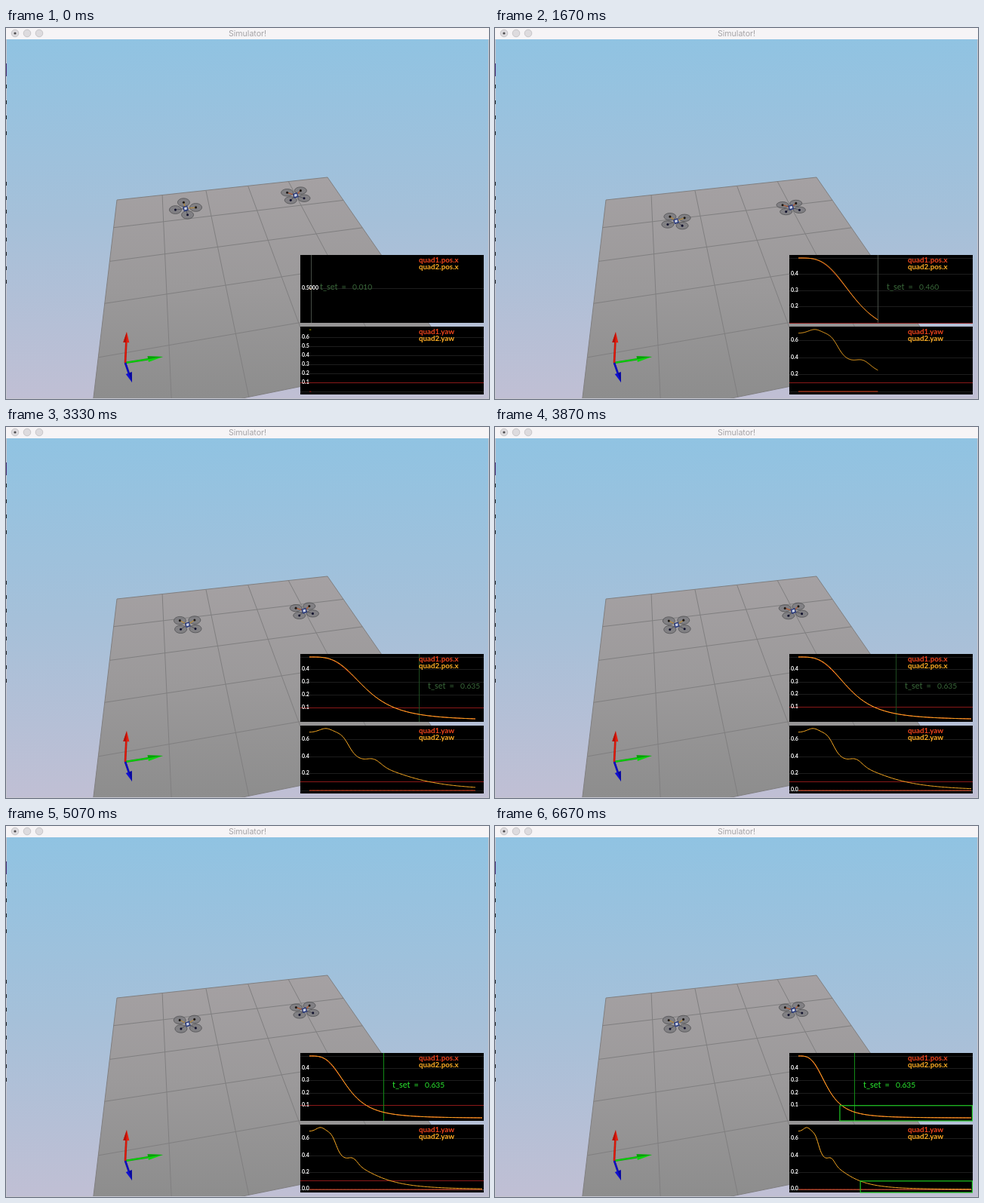
Animation of 640x492 px, one loop 6740 ms. Source, as an HTML page with a canvas:

```html
<!DOCTYPE html>
<html lang="en">
<head>
<meta charset="utf-8">
<title>Simulator!</title>
<style>
  html, body { margin: 0; width: 100%; height: 100%; overflow: hidden; background: #fff; }
  canvas { display: block; width: 640px; height: 492px; }
</style>
</head>
<body>
<canvas id="stage" width="640" height="492"></canvas>
<script>
const ctx = document.getElementById('stage').getContext('2d');
const LOOP = 6740, STEP = 66.67, LAST_STEP = 100;
const SETTLED = 0.635;
const RED = '#f2441c', ORANGE = '#ffae24', GREEN = '#1fc823';

// Smooth fall from 1 to 0, halfway at time `half`
const fall = (t, half, power) => 1 / (1 + (t / half) ** power);
const bump = (t, centre, width) => Math.exp(-(((t - centre) / width) ** 2));

const pos2 = t => .5 * fall(t, .328, 3.4);
const pos1 = t => pos2(t + .005 * bump(t, .18, .1));
const yaw1 = () => 0;
const yaw2 = t => .3 * fall(t, .23, 10) + .39 * fall(t, .53, 3.8)
  + .045 * bump(t, .095, .05) + .06 * bump(t, .375, .055);

const mix = (a, b, p) => a + (b - a) * p;

function line(points, color, width = 1) {
  ctx.beginPath();
  points.forEach(([x, y]) => ctx.lineTo(x, y));
  ctx.strokeStyle = color;
  ctx.lineWidth = width;
  ctx.stroke();
}

function polygon(points, fill) {
  ctx.beginPath();
  points.forEach(([x, y]) => ctx.lineTo(x, y));
  ctx.closePath();
  ctx.fillStyle = fill;
  ctx.fill();
}

function ellipse(x, y, rx, ry, fill, stroke) {
  ctx.beginPath();
  ctx.ellipse(x, y, rx, ry, 0, 0, 2 * Math.PI);
  ctx.fillStyle = fill;
  ctx.fill();
  if (stroke) {
    ctx.strokeStyle = stroke;
    ctx.lineWidth = .9;
    ctx.stroke();
  }
}

function text(str, x, y, color, size, weight = 400, align = 'left', family = 'Lato') {
  ctx.font = `${weight} ${size}px ${family}, sans-serif`;
  ctx.fillStyle = color;
  ctx.textAlign = align;
  ctx.textBaseline = 'middle';
  ctx.fillText(str, x, y);
}

function gradient(y0, y1, ...colors) {
  const g = ctx.createLinearGradient(0, y0, 0, y1);
  colors.forEach((c, i) => g.addColorStop(i / (colors.length - 1), c));
  return g;
}

function drawWindow() {
  ctx.fillStyle = '#c6c7d0';
  ctx.fillRect(0, 0, 640, 492);
  ctx.fillStyle = gradient(15, 491, '#90c3e2', '#a5c0d9', '#c0bfd4');
  ctx.fillRect(1, 15, 638, 476);
  ctx.fillStyle = '#f6f4f6';
  ctx.fillRect(0, 0, 640, 15);
  text('Simulator!', 320, 8.3, '#a5a3a6', 10.6, 400, 'center', 'Inter');
  [12, 28, 44].forEach(x => ellipse(x, 7, 4.8, 4.8, '#dddbde', '#c3c1c4'));
  ellipse(12, 7, 1.6, 1.6, '#4d4b4e');

  // Slivers of the desktop behind the window
  ctx.fillStyle = '#222';
  for (let y = 75; y < 140; y += 20.5) ctx.fillRect(0, Math.round(y), 1, 5);
  for (let y = 204; y < 340; y += 18.6) ctx.fillRect(0, Math.round(y), 1, 5);
  ctx.fillStyle = '#4b2a72';
  ctx.fillRect(0, 47, 1, 17);
}

// Projective map of the unit square onto the floor's four corners
function floorMap([x0, y0], [x1, y1], [x2, y2], [x3, y3]) {
  const ax = x1 - x2, ay = y1 - y2, bx = x3 - x2, by = y3 - y2;
  const sx = x0 - x1 + x2 - x3, sy = y0 - y1 + y2 - y3;
  const det = ax * by - bx * ay;
  const g = (sx * by - bx * sy) / det, h = (ax * sy - sx * ay) / det;
  return (u, v) => {
    const w = 1 + g * u + h * v;
    return [(x0 + (x1 - x0 + g * x1) * u + (x3 - x0 + h * x3) * v) / w,
            (y0 + (y1 - y0 + g * y1) * u + (y3 - y0 + h * y3) * v) / w];
  };
}
const floorPoint = floorMap([147, 228], [426, 198], [590, 435], [111, 532]);

function drawFloor() {
  ctx.save();
  ctx.beginPath();
  ctx.rect(1, 15, 638, 476);
  ctx.clip();
  polygon([floorPoint(0, 0), floorPoint(1, 0), floorPoint(1, 1), floorPoint(0, 1)],
    gradient(198, 491, '#a5a1a3', '#9b999a', '#8d8d8d'));
  for (let i = 0; i <= 5; i++) {
    line([floorPoint(i / 5, 0), floorPoint(i / 5, 1)], '#807f80');
    line([floorPoint(0, i / 5), floorPoint(1, i / 5)], '#807f80');
  }
  ctx.restore();
}

function arrow(x, y, color, dark, head, half) {
  const ox = 158, oy = 444, len = Math.hypot(x - ox, y - oy);
  const ux = (x - ox) / len, uy = (y - oy) / len;
  const bx = x - ux * head, by = y - uy * head;
  line([[ox, oy], [bx, by]], dark, 2.6);
  line([[ox, oy], [bx, by]], color, 1.4);
  polygon([[x, y], [bx - uy * half, by + ux * half], [bx + uy * half, by - ux * half]], color);
  polygon([[x, y], [bx, by], [bx + uy * half, by - ux * half]], dark);
}

function drawAxes() {
  arrow(208, 436, '#0cd60c', '#0a9e0a', 20, 4);
  arrow(160, 403, '#e81c0c', '#b01208', 14, 4);
  arrow(167, 470, '#1010d0', '#08089a', 13, 4.2);
}

function drawQuad(t, { from, to, armX, armY, angle, yaw, accent }) {
  const progress = 1 - pos2(Math.max(0, t - .03)) / .5;
  const x = mix(from[0], to[0], progress), y = mix(from[1], to[1], progress);
  const pitch = 1 + .45 * bump(t, .18, .1) - .1 * bump(t, .45, .1);
  const heading = angle + yaw(t);
  const rotors = [2, 3, 0, 1].map(k => {
    const a = heading + k * Math.PI / 2;
    return [x + armX * Math.cos(a), y + armY * pitch * Math.sin(a)];
  }).sort((p, q) => p[1] - q[1]);

  rotors.forEach(([rx, ry]) => ellipse(rx, ry, 8, .64 * armY * pitch, 'rgba(116,116,119,.7)', '#58585b'));
  rotors.forEach(([rx, ry], i) => {
    line([[x, y], [rx, ry]], i < 2 ? accent : '#5b5b62', 1.1);
    ellipse(rx, ry, 1.5, 1.6, i < 2 ? '#1c1714' : '#10102c');
  });
  polygon([[x - 4, y - 2], [x + 2, y - 4], [x + 4, y + 2], [x - 2, y + 4]], '#283878');
  polygon([[x - 2, y - 1.2], [x + 1.4, y - 2.2], [x + 2, y + 1], [x - 1.4, y + 2]], '#c9d0e4');
}

const quads = [
  { from: [238, 239.5], to: [240.8, 262.8], armX: 13.8, armY: 8.2, angle: -.88, yaw: yaw2, accent: '#b98a35' },
  { from: [383.8, 222], to: [395.6, 244.4], armX: 13, armY: 7.2, angle: -1.04, yaw: yaw1, accent: '#b5562c' }
];

function drawChart(t, { top, curves, range, steps, names, boxFrom, boxAt, marker }) {
  const left = 390, right = 633, bottom = top + 90;
  const plotTop = top + 4, plotBottom = top + 86;
  let [min, max] = range(t);
  const flat = max - min < .0002;
  if (flat) { min -= .0004; max += .0004; }
  const X = s => 402 + 229 * s / Math.max(1, t);
  const Y = v => plotBottom - (plotBottom - plotTop) * (v - min) / (max - min);
  const rule = (v, color) => {
    const y = Math.floor(Y(v)) + .5;
    line([[left, y], [right, y]], color);
  };

  ctx.save();
  ctx.beginPath();
  ctx.rect(left, top, right - left, bottom - top + 1);
  ctx.clip();
  ctx.fillStyle = '#000';
  ctx.fillRect(left, top, right - left, bottom - top);

  const step = flat ? .0005 : steps.find(s => (max - min) / s <= 7) || steps.at(-1);
  const digits = Math.ceil(-Math.log10(step) - 1e-9);
  const labels = [];
  for (let k = Math.ceil(min / step - 1e-6); k * step <= max; k++) {
    const y = Y(k * step);
    rule(k * step, k === 0 && t > 1.1 ? '#4a4a4a' : '#1d1d1d');
    if (y > plotTop + 4 && (y < plotBottom - 3 || (!marker && t > 1.1)))
      labels.push([(k * step).toFixed(digits), y - .7]);
  }

  const boxed = t >= boxAt;
  if (!boxed) rule(.1, '#8a1818');

  if (marker) {
    const mark = Math.min(t, SETTLED), x = Math.floor(X(mark)) + .5, held = t > SETTLED + .5;
    line([[x, top], [x, bottom]], held ? '#128a16' : t > SETTLED ? '#1d4a1f' : '#454b45');
    const color = held ? '#2bea30' : '#3a683a', y = top + 42.5;
    text('t_set', x + 11.5, y, color, 11);
    text('=', x + 40, y, color, 11);
    text(mark.toFixed(3), x + 54.5, y, color, 10.3);
  }

  curves.forEach((curve, i) => {
    const count = 180;
    const points = Array.from({ length: count + 1 }, (_, k) => [X(t * k / count), Y(curve(t * k / count))]);
    line(points, [RED, ORANGE][i]);
  });

  if (boxed) {
    ctx.strokeStyle = GREEN;
    ctx.lineWidth = 1.2;
    ctx.strokeRect(X(boxFrom), Y(.1), right - .6 - X(boxFrom), bottom - Y(.1));
  }
  labels.forEach(([label, y]) => text(label, 392, y, '#fff', 7, 700));
  names.forEach((name, i) => text(name, 547, top + 7 + 9 * i, [RED, ORANGE][i], 9.8, 700));
  ctx.restore();
}

const charts = [
  { top: 301, curves: [pos1, pos2], range: t => [pos2(t), .5], steps: [.0001, .0005, .001, .005, .01, .05, .1],
    names: ['quad1.pos.x', 'quad2.pos.x'], boxFrom: .47, boxAt: 1.715, marker: true },
  { top: 396, curves: [yaw1, yaw2], range: t => [0, yaw2(Math.min(t, .085))], steps: [.1, .2],
    names: ['quad1.yaw', 'quad2.yaw'], boxFrom: .703, boxAt: 1.705 }
];

function render(now) {
  const step = Math.min(LAST_STEP, Math.floor((now % LOOP + 7) / STEP));
  const t = Math.max(.01, .02 * (step - 2));
  drawWindow();
  drawFloor();
  quads.forEach(quad => drawQuad(t, quad));
  drawAxes();
  charts.forEach(chart => drawChart(t, chart));
}

const start = performance.now();
function tick() {
  render(performance.now() - start);
  requestAnimationFrame(tick);
}
tick();
</script>
</body>
</html>
```
